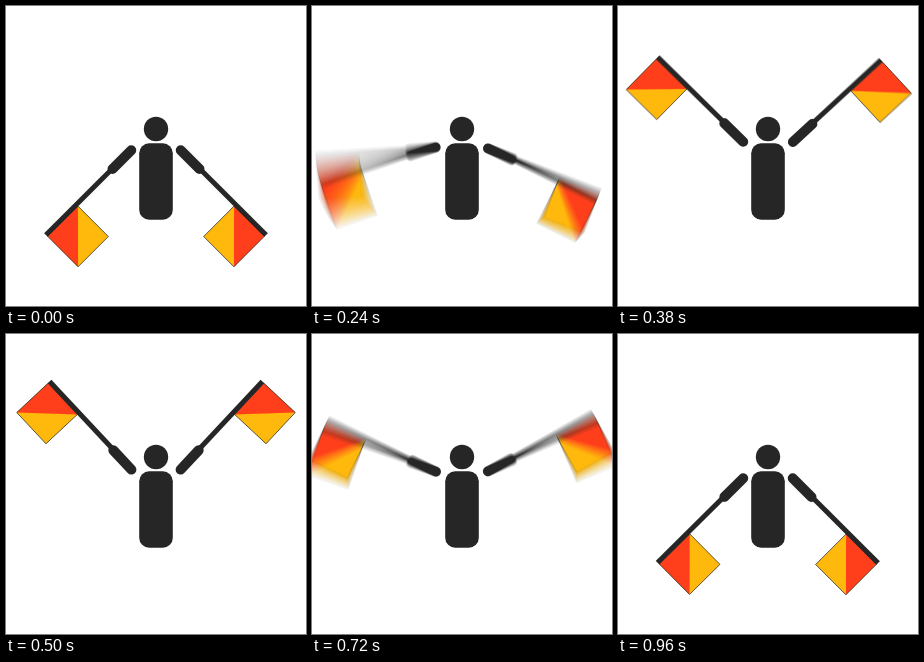
Write an HTML page with a canvas that moves like this. It is 300x300 px and loops after 980 ms.

```html
<!DOCTYPE html>
<html lang="en">
<head>
<meta charset="utf-8">
<title>Semaphore</title>
<style>
  html, body { margin: 0; width: 100%; height: 100%; overflow: hidden; background: #fff; }
  canvas { display: block; width: 300px; height: 300px; }
</style>
</head>
<body>
<canvas id="stage" width="300" height="300"></canvas>
<script>
const SIZE = 300, LOOP = 980, STEP = 20, SHUTTER = 14;
const INK = '#262626', RED = '#ff3f1b', YELLOW = '#ffb90c';
const LOW = 45, SWING = 92;

// Each arm rises and falls with its own timing: [start, end] in ms.
const LEFT = { rise: [16, 482], fall: [482, 1000] };
const RIGHT = { rise: [16, 516], fall: [532, 955] };

const ctx = document.getElementById('stage').getContext('2d');
const buffer = document.createElement('canvas');
buffer.width = buffer.height = SIZE;
const pen = buffer.getContext('2d', { willReadFrequently: true });

// Cubic bezier easing (0.9, 0, 0.1, 1), solved by bisection.
function ease(x) {
  if (x <= 0) return 0;
  if (x >= 1) return 1;
  let lo = 0, hi = 1, s = 0.5;
  for (let i = 0; i < 24; i++) {
    s = (lo + hi) / 2;
    const r = 1 - s;
    const at = 2.7 * s * r * r + 0.3 * s * s * r + s * s * s;
    if (at < x) lo = s; else hi = s;
  }
  return s * s * (3 - 2 * s);
}

const progress = (t, [start, end]) => ease((t - start) / (end - start));

// Degrees below the horizontal.
function armAngle(arm, t) {
  return LOW - SWING * (progress(t, arm.rise) - progress(t, arm.fall));
}

function polygon(points, color) {
  pen.beginPath();
  points.forEach(([x, y]) => pen.lineTo(x, y));
  pen.closePath();
  pen.fillStyle = color;
  pen.fill();
}

function drawArm(angle, mirrored) {
  pen.save();
  if (mirrored) {
    pen.translate(SIZE, 0);
    pen.scale(-1, 1);
  }
  pen.translate(129.5, 140);
  pen.rotate(Math.PI - angle * Math.PI / 180);

  const near = 83.2, far = 126, hoist = -1.8, fly = -44.8;
  polygon([[near, hoist], [far, hoist], [far, fly], [near, fly]], YELLOW);
  polygon([[near, hoist], [far, hoist], [far, fly]], RED);
  pen.strokeStyle = INK;
  pen.lineWidth = 0.7;
  pen.strokeRect(near, fly, far - near, hoist - fly);

  pen.fillStyle = INK;
  pen.fillRect(30, -2.1, far - 29.7, 5);
  pen.lineWidth = 10;
  pen.lineCap = 'round';
  pen.beginPath();
  pen.moveTo(6, 0);
  pen.lineTo(32.5, 0);
  pen.stroke();
  pen.restore();
}

function drawScene(t) {
  pen.fillStyle = '#fff';
  pen.fillRect(0, 0, SIZE, SIZE);
  pen.fillStyle = INK;
  pen.beginPath();
  pen.arc(150, 123, 12.2, 0, Math.PI * 2);
  pen.fill();
  pen.beginPath();
  pen.roundRect(133.2, 137.2, 33.6, 76.6, 10);
  pen.fill();
  drawArm(armAngle(LEFT, t), false);
  drawArm(armAngle(RIGHT, t), true);
}

function sweep(arm, t) {
  return Math.abs(armAngle(arm, t + SHUTTER / 2) - armAngle(arm, t - SHUTTER / 2));
}

// Average several moments of the exposure for motion blur.
function expose(t) {
  const turned = Math.max(sweep(LEFT, t), sweep(RIGHT, t));
  const count = Math.min(32, 1 + Math.ceil(turned * 1.5));
  const sum = new Float32Array(SIZE * SIZE * 4);
  for (let i = 0; i < count; i++) {
    drawScene(t + SHUTTER * ((i + 0.5) / count - 0.5));
    const { data } = pen.getImageData(0, 0, SIZE, SIZE);
    for (let k = 0; k < sum.length; k++) sum[k] += data[k];
  }
  const image = ctx.createImageData(SIZE, SIZE);
  for (let k = 0; k < sum.length; k++) image.data[k] = sum[k] / count;
  ctx.putImageData(image, 0, 0);
}

const began = performance.now();
let shown = -1;

function tick() {
  const elapsed = (performance.now() - began) % LOOP;
  const t = Math.floor(elapsed / STEP) * STEP;
  if (t !== shown) {
    expose(t);
    shown = t;
  }
  requestAnimationFrame(tick);
}
tick();
</script>
</body>
</html>
```
